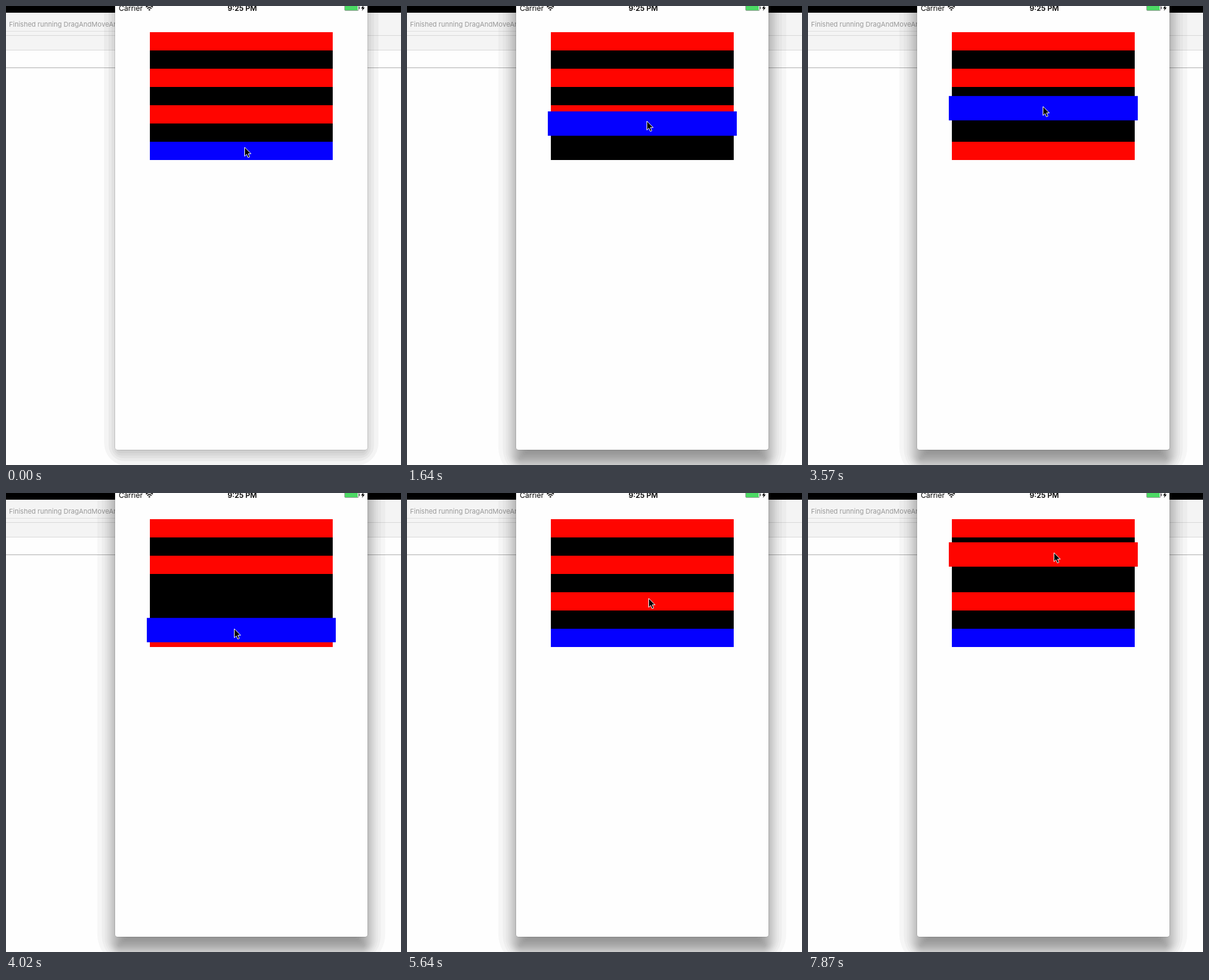
Recreate the animation shown at these times as an HTML page. Size 648 by 754 pixels, loop 8 s.

```html
<!DOCTYPE html>
<html lang="en">
<head>
<meta charset="utf-8">
<title>Drag and move</title>
<style>
  html, body { margin: 0; width: 100%; height: 100%; overflow: hidden; background: #fefefe; }
  svg { display: block; width: 648px; height: 754px; }
  text { font-family: Inter, Roboto, sans-serif; }
</style>
</head>
<body>
<svg viewBox="0 0 648 754">
  <rect width="648" height="754" fill="#fefefe"/>
  <rect y="11" width="648" height="62" fill="#f4f4f4"/>
  <rect y="41" width="179" height="1" fill="#dedede"/>
  <rect y="48" width="648" height="1" fill="#d8d8d8"/>
  <rect y="72" width="648" height="1" fill="#dadada"/>
  <rect y="101" width="648" height="1" fill="#b0b0b0"/>
  <text x="5" y="34" font-size="11" fill="#999">Finished running DragAndMoveAr</text>
  <g id="idle"></g>
  <g id="active"></g>
  <rect width="648" height="11"/>
  <rect x="178.5" y="-60" width="415" height="789.5" rx="4.5" fill="#000" opacity=".2"/>
  <rect x="179" y="-60" width="414" height="789" rx="4" fill="#fefefe"/>

  <text x="185" y="8" font-size="12">Carrier</text>
  <g fill="none" stroke="#000" stroke-width="1.6">
    <path d="M229.6 1.9Q235.2 -3 240.8 1.9M231.7 4.2Q235.2 1.2 238.7 4.2"/>
    <path d="M233.3 5.9Q235.2 4.4 237.1 5.9L235.2 7.8Z" fill="#000" stroke="none"/>
  </g>
  <text x="387.5" y="8" font-size="12" font-weight="600" text-anchor="middle">9:25 PM</text>
  <rect x="555.5" y="-2" width="23" height="9.5" rx="1.5" fill="none" stroke="#000" stroke-opacity=".55" stroke-width=".7"/>
  <rect x="556" y="-1" width="21" height="8" fill="#4cd964"/>
  <rect x="579" y="1" width="1" height="4" fill="#333"/>
  <path d="M586.5 -1L582.5 4H585L584 8L588.5 2.6H586Z"/>

  <rect x="236" y="43" width="300" height="210"/>
  <g id="cells"></g>
  <path id="cursor" d="M.5 1V15.8L3.8 12.7L6.2 18L8.7 16.9L6.4 11.7H11Z" stroke="#fff" stroke-width="1"/>
</svg>
<script>
const LOOP = 8000, RED = '#ff0500', BLUE = '#0500ff';
const $ = id => document.getElementById(id);

function addRect(parent, attrs) {
  const r = document.createElementNS('http://www.w3.org/2000/svg', 'rect');
  for (const k in attrs) r.setAttribute(k, attrs[k]);
  return parent.appendChild(r);
}

// Window shadow as stacked translucent bands with a soft falloff
function shadow(parent, dy, spread, alpha, step) {
  for (let a = step; a < alpha * 0.95; a += step) {
    const d = spread * Math.log(alpha / a - 1);
    addRect(parent, {
      x: 179 - d, y: -60 + dy - d, width: 414 + 2 * d, height: 789 + 2 * d,
      rx: Math.max(4, d * 1.5 + 10), opacity: step
    });
  }
}
shadow($('idle'), 8, 8.8, 0.35, 0.04);
shadow($('active'), 20, 9.9, 0.6, 0.03);

const cell = fill => addRect($('cells'), { fill });
const top0 = cell(RED), redB = cell(RED), redC = cell(RED), blue = cell(BLUE);

// Centre y and lift amount (0 resting, 1 picked up)
function place(el, cy, lift) {
  const w = 300 + 10 * lift, h = 30 + 10 * lift;
  el.setAttribute('x', 386 - w / 2);
  el.setAttribute('y', cy - h / 2);
  el.setAttribute('width', w);
  el.setAttribute('height', h);
}
place(top0, 58, 0);

// Screen updates: start, end, number of steps
const BURSTS = [[450, 450, 1], [1050, 2080, 8], [2230, 2380, 2], [2670, 2970, 3],
  [3420, 4460, 8], [4610, 5640, 8], [6990, 7870, 7]];

function snap(t) {
  let shown = 0;
  for (const [from, to, n] of BURSTS) {
    if (t < from) break;
    const gap = n > 1 ? (to - from) / (n - 1) : 1;
    shown = Math.min(to, from + Math.floor((t - from) / gap + 0.03) * gap);
  }
  return shown;
}

function track(keys, t, i = 1) {
  if (t <= keys[0][0]) return keys[0][i];
  for (let k = 1; k < keys.length; k++) {
    const a = keys[k - 1], b = keys[k];
    if (t <= b[0]) return a[i] + (b[i] - a[i]) * (t - a[0]) / (b[0] - a[0]);
  }
  return keys[keys.length - 1][i];
}

function ease(t, from, ms) {
  const p = Math.min(1, Math.max(0, (t - from) / ms));
  return p * p * (3 - 2 * p);
}
const ramp = (t, from, ms) => Math.min(1, Math.max(0, (t - from) / ms));

const POINTER = [[1190, 391, 231], [1640, 393, 188], [2080, 393, 171], [2380, 392, 159],
  [2670, 392, 152], [2970, 391, 144], [3420, 389, 148], [3720, 381, 180], [4020, 374, 223],
  [4320, 375, 240], [4460, 376, 245], [4900, 376, 245], [5350, 391, 190], [5640, 396, 172],
  [7137, 396, 172], [7430, 399, 147], [7870, 403, 97]];
const BLUE_Y = [[1190, 238], [1640, 193], [2080, 176], [2380, 164], [2670, 157], [2970, 149],
  [3420, 152], [3720, 184], [4020, 226], [4320, 242], [4460, 247], [4770, 247], [5000, 238]];
const RED_Y = [[7137, 178], [7430, 152], [7870, 101]];

function draw(time) {
  const t = snap(time);
  const focused = t >= 450;
  $('idle').style.display = focused ? 'none' : '';
  $('active').style.display = focused ? '' : 'none';

  place(blue, track(BLUE_Y, t), ramp(t, 1015, 175) - ramp(t, 4770, 230));

  // Displaced rows glide into the vacated slot
  const away = ease(t, 2090, 285) - ease(t, 4330, 310);
  const pick = ramp(t, 6955, 175);
  place(redC, t < 6900 ? 178 + 60 * away : track(RED_Y, t), pick);
  place(redB, 118 + 60 * ease(t, 7500, 320), 0);

  const x = Math.round(track(POINTER, t)), y = Math.round(track(POINTER, t, 2));
  $('cursor').setAttribute('transform', `translate(${x} ${y})`);
}

let start;
function tick(now) {
  if (start === undefined) start = now;
  draw((now - start) % LOOP);
  requestAnimationFrame(tick);
}
draw(0);
requestAnimationFrame(tick);
</script>
</body>
</html>
```
